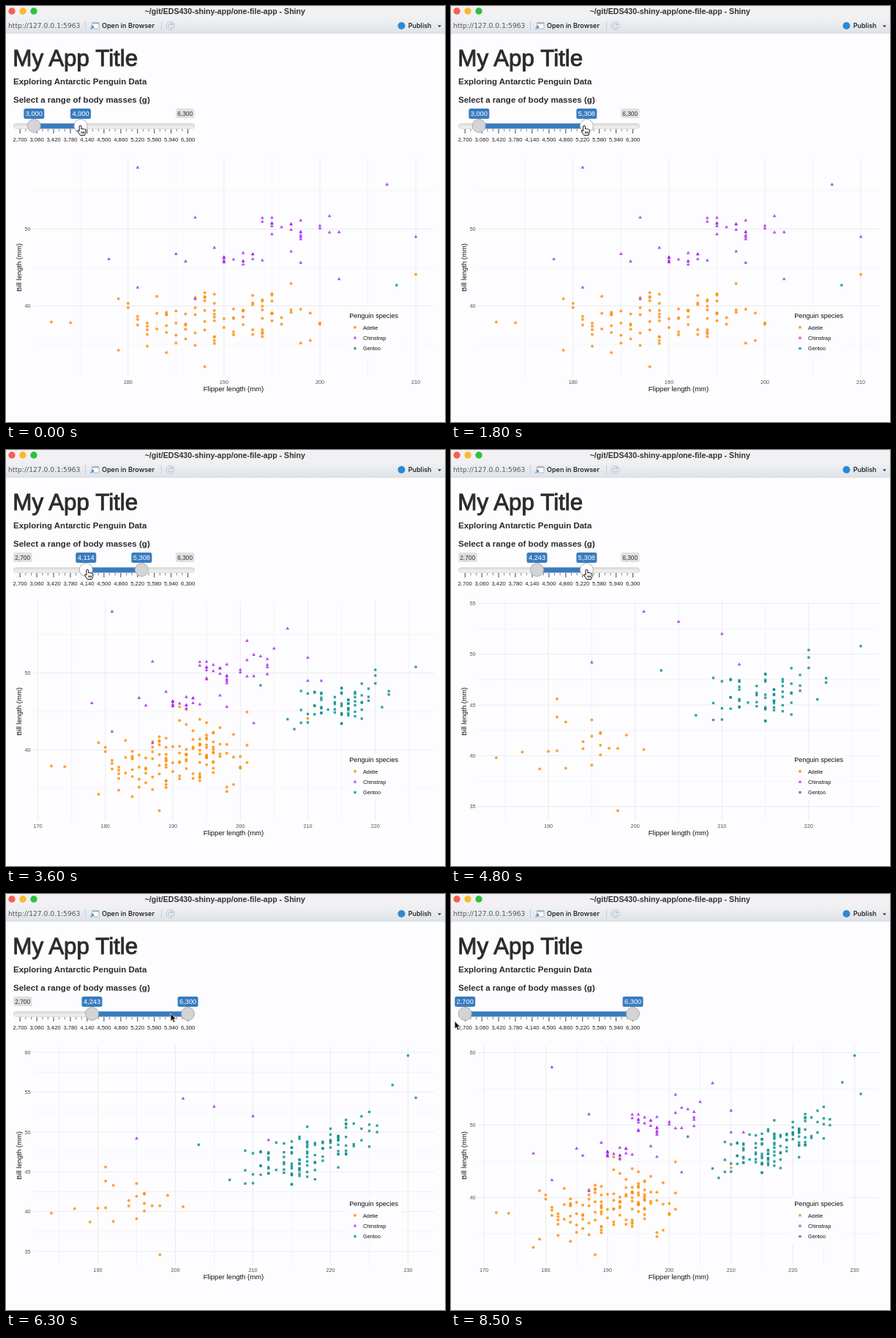
These frames come from a looping animation (600x568 px, 8600 ms). An HTML page:

```html
<!DOCTYPE html>
<html lang="en">
<head>
<meta charset="utf-8">
<title>Penguin explorer</title>
<style>
  html, body { margin: 0; height: 100%; overflow: hidden; background: #fdfcfe; }
  svg { display: block; width: 100vw; height: 100vh; font-family: "Liberation Sans", Arial, sans-serif; }
  .mid { text-anchor: middle; }
  .end { text-anchor: end; }
  .bold { font-weight: 700; }
  .tool { font: 500 9.1px Inter, sans-serif; fill: #111; }
  .tick { font-size: 7.3px; fill: #555; }
  .axis { font-size: 9.5px; fill: #111; }
  .grid { stroke: #ebebee; }
  .minor { stroke-width: .55; }
  .Adelie { fill: #ff8c00; fill-opacity: .8; }
  .Gentoo { fill: #008b8b; fill-opacity: .8; }
  .Chinstrap { fill: #a020f0; fill-opacity: .8; }
  .knob { stroke: #a8a8a8; stroke-width: .9; }
  .blue { fill: #397cbf; }
  .bound rect { fill: #e0e0e0; }
  .bound text { font-size: 8.4px; fill: #333; }
</style>
</head>
<body>
<svg viewBox="0 0 600 568">
  <defs>
    <linearGradient id="bar" x2="0" y2="1"><stop stop-color="#eff1f4"/><stop offset="1" stop-color="#dfe3e9"/></linearGradient>
    <linearGradient id="rail" x2="0" y2="1"><stop stop-color="#dcdcdc"/><stop offset="1" stop-color="#f6f6f6"/></linearGradient>
  </defs>
  <rect width="600" height="568" fill="#fdfcfe"/>

  <!-- window frame -->
  <rect width="600" height="17" fill="#f2f0f2"/>
  <rect y="17" width="600" height="20" fill="url(#bar)"/>
  <path d="M0 37.3H600" stroke="#d3d5d9" stroke-width=".8"/>
  <circle cx="8" cy="7" r="4.7" fill="#fb5d56"/>
  <circle cx="23" cy="7" r="4.7" fill="#fbb82e"/>
  <circle cx="38" cy="7" r="4.7" fill="#2bc23f"/>
  <text class="mid bold" x="299.3" y="10.8" font-size="10.6" fill="#333">~/git/EDS430-shiny-app/one-file-app - Shiny</text>
  <text x="3" y="30" font-size="9.2" fill="#555" font-family="DejaVu Sans, sans-serif">http://127.0.0.1:5963</text>
  <path d="M108.5 21V33M212.5 21V33" stroke="#c9ccd1"/>
  <g stroke="#9aa6b4" stroke-width=".8">
    <rect x="117.5" y="22.5" width="9.5" height="8.5" rx="1" fill="#fff"/>
    <path d="M117.5 23.8h9.5" stroke-width="1.3"/>
    <path d="M115.5 31.5l4-4m-3 0h3v3" fill="none" stroke="#4f94cc" stroke-width="1.2"/>
  </g>
  <text class="tool" x="131" y="30">Open in Browser</text>
  <circle cx="224.5" cy="27" r="5.5" fill="#e9edf2" stroke="#bcc2ca"/>
  <path d="M226.8 25.2A2.9 2.9 0 1 0 227.4 28M227.4 23.4v2.3h-2.3" fill="none" stroke="#a8b3c0"/>
  <circle cx="540.5" cy="27" r="5" fill="#2e88cf"/>
  <text class="tool" x="549.7" y="30">Publish</text>
  <path d="M590 26.2h5l-2.5 3z" fill="#444"/>

  <!-- page heading -->
  <g fill="#2b2b2b">
    <text x="9.3" y="81.6" font-size="31.4" stroke="#2b2b2b" stroke-width=".9">My App Title</text>
    <text class="bold" x="10" y="107" font-size="11.5">Exploring Antarctic Penguin Data</text>
    <text class="bold" x="10" y="132" font-size="11.55">Select a range of body masses (g)</text>
  </g>

  <!-- slider -->
  <rect x="10.5" y="160.8" width="247" height="6.4" rx="3.2" fill="url(#rail)" stroke="#cbcbcb" stroke-width=".8"/>
  <rect class="blue" id="span" y="160.4" height="7"/>
  <g id="scale"></g>
  <g class="bound" id="lowBound"><rect x="10" y="140" width="25.5" height="13" rx="2.5"/><text class="mid" x="22.7" y="149.6">2,700</text></g>
  <g class="bound" id="highBound"><rect x="232" y="140" width="25.5" height="13" rx="2.5"/><text class="mid" x="244.7" y="149.6">6,300</text></g>
  <g id="knobs"></g>

  <!-- chart -->
  <g id="plots"></g>
  <text class="axis mid" x="311" y="526">Flipper length (mm)</text>
  <text class="axis mid" transform="translate(21 357) rotate(-90)">Bill length (mm)</text>
  <rect x="464" y="414" width="77" height="64" fill="#fdfcfe"/>
  <text x="469.3" y="426" font-size="9.1" fill="#111">Penguin species</text>
  <g id="legend"></g>

  <g id="pointer" stroke="#111" stroke-linejoin="round">
    <path id="hand" fill="#fff" d="M-1.4 1Q0-1 1.4 1V5Q2.5 3.8 3.6 5Q4.8 4 5.8 5.4Q7.5 5 7.4 7V9.5Q7.2 11 6.3 12.3V13.4H-.2Q-1 12-3.7 8.2Q-4 6.5-2.6 6.9L-1.4 8ZM1.6 8.5v2.6M3.4 8.5v2.6M5.1 8.5v2.6"/>
    <path id="arrow" fill="#111" stroke="#fff" stroke-width=".7" d="M0 0V10.6L2.4 8.5L4.1 12.4L6 11.6L4.3 7.8H7.6Z"/>
  </g>
</svg>
<script>
const LOOP = 8600, STEP = 100;
const PANEL = { left: 37, right: 585, top: 207, bottom: 506 };
const $ = id => document.getElementById(id);
const add = (parent, tag, attrs, text) => {
  const node = document.createElementNS('http://www.w3.org/2000/svg', tag);
  set(node, attrs);
  if (text !== undefined) node.textContent = text;
  return parent.appendChild(node);
};
const set = (node, attrs) => { for (const key in attrs) node.setAttribute(key, attrs[key]); };
const show = (node, on) => { node.style.display = on ? '' : 'none'; };
const grams = v => Math.round(v).toLocaleString('en-US');
const clamp = v => Math.max(0, Math.min(1, v));
const mix = (a, b, k) => a + (b - a) * k;

let seed = 11;
const random = () => (seed = seed * 16807 % 2147483647) / 2147483647;

// Mass bands: 0 below 3000 g, 1 to 4000, 2 to 4243, 3 to 5308, 4 above.
const penguins = [];
const bird = (kind, band, flipper, bill) => penguins.push({ kind, band, flipper, bill });
// Scatters n birds around a centre, with bills that grow by slope per mm of flipper.
const cloud = (kind, band, n, flipper, reach, bill, spread, slope = 0) => {
  for (let i = 0; i < n; i++) {
    const dx = Math.round(reach * (random() - random()));
    bird(kind, band, flipper + dx, bill + slope * dx + spread * (random() - random()));
  }
};

cloud('Adelie', 1, 96, 189, 13, 38.3, 4.5, .08);
cloud('Adelie', 2, 15, 194, 8, 40.5, 5);
cloud('Adelie', 3, 20, 195, 9, 41, 4);
cloud('Gentoo', 3, 68, 214, 9, 46, 3.5, .25);
cloud('Gentoo', 4, 46, 221, 9, 49.3, 3.4, .2);
cloud('Chinstrap', 1, 20, 192, 8, 46.2, 1.5);
cloud('Chinstrap', 1, 22, 197, 6, 50.5, 2);
cloud('Chinstrap', 2, 7, 202, 8, 51, 2);

// Birds at the edges of the clouds, which set the axis limits.
bird('Adelie', 0, 178, 33.1);
bird('Adelie', 1, 172, 37.9);
bird('Adelie', 1, 174, 37.8);
bird('Adelie', 1, 188, 32.1);
bird('Adelie', 1, 210, 44.1);
bird('Adelie', 3, 184, 39.8);
bird('Adelie', 3, 198, 34.6);
bird('Adelie', 3, 191, 45.6);
bird('Gentoo', 1, 208, 42.7);
bird('Gentoo', 3, 203, 48.4);
bird('Gentoo', 3, 226, 50.8);
bird('Gentoo', 4, 228, 55.9);
bird('Gentoo', 4, 230, 59.6);
bird('Gentoo', 4, 231, 54.3);
bird('Chinstrap', 1, 178, 46.1);
bird('Chinstrap', 1, 181, 58);
bird('Chinstrap', 1, 181, 42.4);
bird('Chinstrap', 1, 187, 40.9);
bird('Chinstrap', 1, 187, 51.5);
bird('Chinstrap', 1, 202, 43.5);
bird('Chinstrap', 1, 207, 55.8);
bird('Chinstrap', 1, 210, 49);
bird('Chinstrap', 3, 195, 49.2);
bird('Chinstrap', 3, 201, 54.2);
bird('Chinstrap', 3, 205, 53.2);
bird('Chinstrap', 3, 210, 52);
bird('Chinstrap', 3, 212, 49);

const mark = (parent, kind, x, y) => {
  if (kind === 'Adelie') add(parent, 'circle', { class: kind, cx: x, cy: y, r: 2 });
  else if (kind === 'Gentoo') add(parent, 'rect', { class: kind, x: x - 1.65, y: y - 1.65, width: 3.3, height: 3.3 });
  else add(parent, 'path', { class: kind, d: `M${x} ${y - 2.6}l2.35 4.1h-4.7z` });
};

// Linear scale over the data, widened by 5% on both sides.
const fit = (values, from, to) => {
  const low = Math.min(...values), range = Math.max(...values) - low;
  const scale = v => from + (to - from) * ((v - low) / range + .05) / 1.1;
  return { scale, range };
};

const makeView = (start, first, last) => {
  const node = add($('plots'), 'g', {});
  const birds = penguins.filter(p => p.band >= first && p.band <= last);
  const { scale: px } = fit(birds.map(p => p.flipper), PANEL.left, PANEL.right);
  const { scale: py, range } = fit(birds.map(p => p.bill), PANEL.bottom, PANEL.top);
  const line = (d, major) => add(node, 'path', { d, class: major ? 'grid' : 'grid minor' });
  for (let v = 160; v <= 240; v += 5) {
    const x = px(v), major = v % 10 === 0;
    if (x < PANEL.left || x > PANEL.right) continue;
    line(`M${x} ${PANEL.top}V${PANEL.bottom}`, major);
    if (major) add(node, 'text', { class: 'tick mid', x, y: 515.7 }, v);
  }
  const billStep = range > 25.5 ? 10 : 5;
  for (let v = 30; v <= 65; v += billStep / 2) {
    const y = py(v), major = v % billStep === 0;
    if (y < PANEL.top || y > PANEL.bottom) continue;
    line(`M${PANEL.left} ${y}H${PANEL.right}`, major);
    if (major) add(node, 'text', { class: 'tick end', x: 33.5, y: y + 2.6 }, v);
  }
  for (const p of birds) mark(node, p.kind, px(p.flipper), py(p.bill));
  return { start, node };
};
const views = [makeView(0, 1, 1), makeView(1900, 1, 3), makeView(4200, 3, 3), makeView(6000, 3, 4), makeView(8300, 0, 4)];

['Adelie', 'Chinstrap', 'Gentoo'].forEach((kind, i) => {
  const y = 438.7 + i * 14.4;
  mark($('legend'), kind, 477, y);
  add($('legend'), 'text', { x: 488, y: y + 2.8, 'font-size': 7.3, fill: '#111' }, kind);
});

const toX = v => 19.2 + (v - 2700) / 3600 * 229.4;
for (let i = 0; i <= 30; i++) {
  const mass = 2700 + i * 120, x = toX(mass), major = i % 3 === 0;
  add($('scale'), 'path', { d: `M${x} 168v${major ? 6 : 3.3}`, stroke: major ? '#333' : '#777', 'stroke-width': .9 });
  if (major) add($('scale'), 'text', { class: 'mid', x, y: 184.6, 'font-size': 7.7, fill: '#222' }, grams(mass));
}

const makeKnob = () => {
  const node = add($('knobs'), 'g', {});
  add(node, 'rect', { class: 'blue', x: -14, y: 140, width: 28, height: 14, rx: 2.5 });
  return {
    node,
    label: add(node, 'text', { class: 'mid', y: 150.4, 'font-size': 9.3, fill: '#fff' }),
    disc: add(node, 'circle', { class: 'knob', cy: 163.5, r: 9 })
  };
};
const knobs = { low: makeKnob(), high: makeKnob() };

// grab: where the pointer takes hold, relative to the middle of the knob.
const drags = [
  { knob: 'high', start: 0, end: 1330, from: 4000, to: 5308, grab: -.5 },
  { knob: 'low', start: 2600, end: 3716, from: 3000, to: 4243, grab: -6 },
  { knob: 'high', start: 4900, end: 5700, from: 5308, to: 6300, grab: 0 },
  { knob: 'low', start: 7100, end: 7900, from: 4243, to: 2700, grab: 0 }
];
const PAUSE = 300, RELEASE = 3, HOLD_Y = 163;
const exit = { start: 8400 + PAUSE, x: 5, y: 173.5 };

const progress = (drag, t) => clamp((t - drag.start) / (drag.end - drag.start));
const valueOf = (knob, t) => {
  const own = drags.filter(drag => drag.knob === knob);
  const drag = own.filter(d => d.start <= t).pop() || own[0];
  return mix(drag.from, drag.to, progress(drag, t));
};

function tipAt(t) {
  const i = drags.findLastIndex(drag => drag.start <= t), drag = drags[i], next = drags[i + 1];
  const k = progress(drag, t);
  const x = toX(mix(drag.from, drag.to, k)) + mix(drag.grab, RELEASE, k);
  const goal = next ? { start: next.start, x: toX(next.from) + next.grab, y: HOLD_Y } : exit;
  const leave = drag.end + PAUSE + 100;
  const go = clamp((t - leave) / (goal.start - PAUSE - leave));
  const eased = go * go * (3 - 2 * go);
  return [mix(x, goal.x, eased), mix(HOLD_Y, goal.y, eased)];
}

const placeKnob = (knob, value, tip) => {
  const x = toX(value), hover = Math.hypot(tip[0] - x, tip[1] - 163.5) < 11;
  set(knob.node, { transform: `translate(${x})` });
  set(knob.disc, { fill: hover ? '#fff' : '#d4d3d5' });
  knob.label.textContent = grams(value);
  return hover;
};

function draw(now) {
  const t = Math.floor(now % LOOP / STEP) * STEP;
  const low = valueOf('low', t), high = valueOf('high', t), tip = tipAt(t);
  const overLow = placeKnob(knobs.low, low, tip), overHigh = placeKnob(knobs.high, high, tip);
  set($('span'), { x: toX(low), width: toX(high) - toX(low) });
  show($('lowBound'), toX(low) - 14 > 36);
  show($('highBound'), toX(high) + 14 < 231);
  set($('pointer'), { transform: `translate(${tip})` });
  show($('hand'), overLow || overHigh);
  show($('arrow'), !overLow && !overHigh);
  const current = views.filter(view => view.start <= t).pop();
  views.forEach(view => show(view.node, view === current));
}

const begin = performance.now();
const tick = () => { draw(performance.now() - begin); requestAnimationFrame(tick); };
tick();
</script>
</body>
</html>
```
